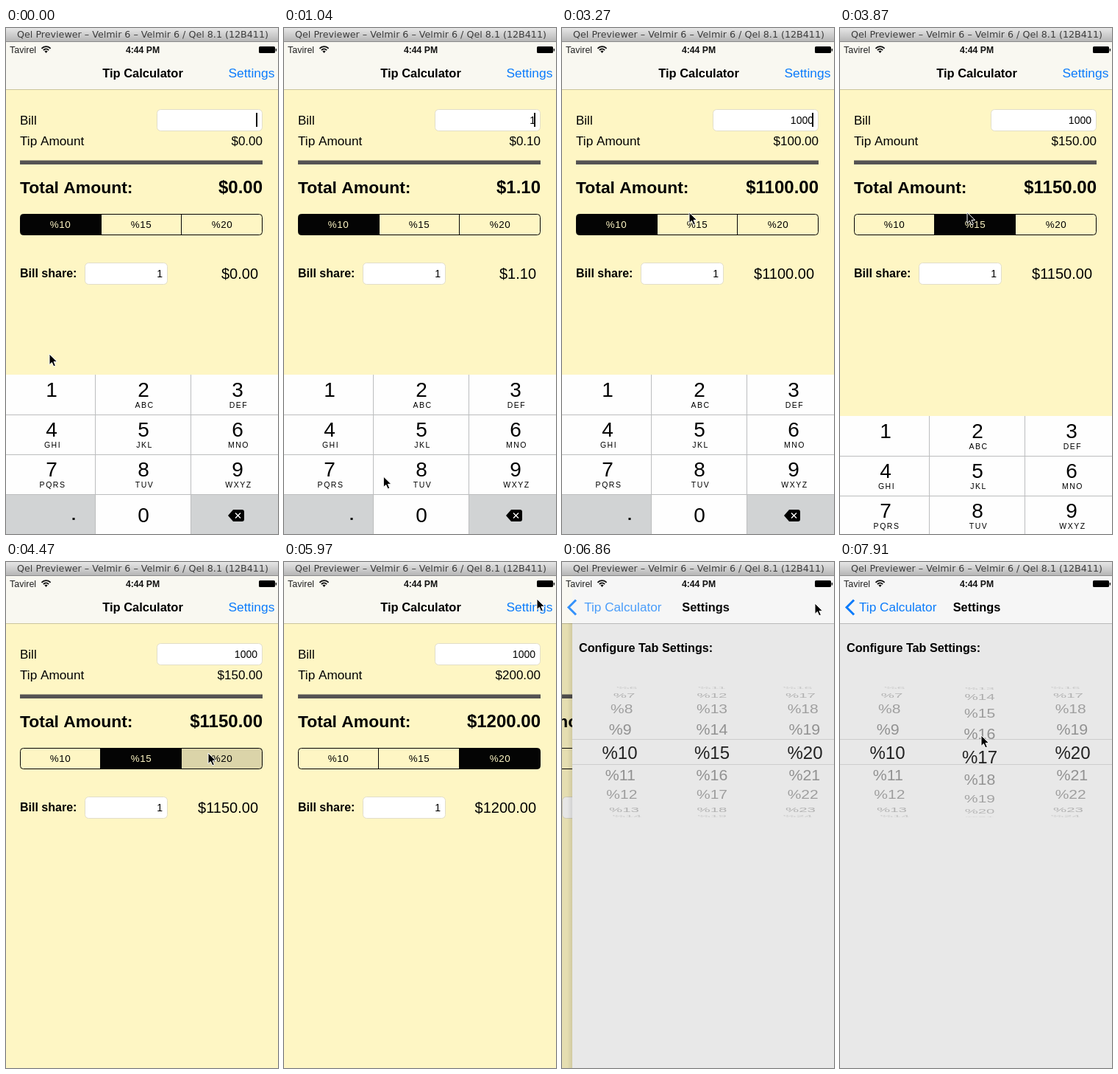
An HTML page with a canvas that plays this animation: 370 by 686 pixels, repeating every 8000 ms.

```html
<!DOCTYPE html>
<html lang="en">
<head>
<meta charset="utf-8">
<title>Tip Calculator</title>
<style>
html, body { margin: 0; height: 100%; overflow: hidden; }
canvas { display: block; width: 370px; height: 686px; }
</style>
</head>
<body>
<canvas id="stage"></canvas>
<script>
const W = 370, H = 686, LOOP = 8000, STEP = 149;
const SANS = '"Liberation Sans", Arial, sans-serif';
const YELLOW = '#fef6c4', BLUE = '#0a7bfb', BLACK = '#040404';
const canvas = document.getElementById('stage');
const c = canvas.getContext('2d');
const dpr = window.devicePixelRatio || 1;
canvas.width = W * dpr;
canvas.height = H * dpr;

// pointer path: step, x, y
const PATH = [[0, 59, 442], [1, 59, 442], [4, 62, 492], [5, 62, 492], [8, 172, 666],
  [12, 172, 666], [16, 172, 651], [18, 162, 580], [20, 160, 400], [22, 173, 250],
  [27, 173, 250], [30, 275, 259], [35, 275, 259], [40, 344, 50], [42, 344, 50],
  [44, 344, 56], [46, 344, 56], [49, 192, 290], [50, 192, 290], [53, 192, 235]];
const LETTERS = ['', 'ABC', 'DEF', 'GHI', 'JKL', 'MNO', 'PQRS', 'TUV', 'WXYZ'];
const KEY_X = [62, 187, 315], EDGES = [0, 122, 252, W];

const clamp = v => Math.max(0, Math.min(1, v));

function pointer(n) {
  const i = PATH.findIndex(k => k[0] >= n);
  if (i < 1) return PATH[i < 0 ? PATH.length - 1 : 0].slice(1);
  const [a, ax, ay] = PATH[i - 1], [b, bx, by] = PATH[i];
  const u = (n - a) / (b - a);
  return [ax + (bx - ax) * u, ay + (by - ay) * u];
}

function rect(x, y, w, h, fill) {
  c.fillStyle = fill;
  c.fillRect(x, y, w, h);
}

function text(s, x, y, size, { align = 'left', bold = false, color = '#000', font = SANS, gap = 0 } = {}) {
  c.font = `${bold ? 'bold ' : ''}${size}px ${font}`;
  c.letterSpacing = gap + 'px';
  c.textAlign = align;
  c.fillStyle = color;
  c.fillText(s, x, y);
}

function layer(draw, x = 0, y = 0, alpha = 1) {
  c.save();
  c.translate(x, y);
  c.globalAlpha *= alpha;
  draw();
  c.restore();
}

function shape(points, fill) {
  c.beginPath();
  points.forEach(([x, y]) => c.lineTo(x, y));
  c.closePath();
  c.fillStyle = fill;
  c.fill();
}

function field(x, y, w, h) {
  c.beginPath();
  c.roundRect(x + .5, y + .5, w - 1, h - 1, 5);
  c.fillStyle = '#fff';
  c.fill();
  c.strokeStyle = '#e2dec9';
  c.lineWidth = 1;
  c.stroke();
}

function segments(active, pressed) {
  layer(() => {
    c.beginPath();
    c.roundRect(19.5, 252.5, 329, 28, 4);
    c.save();
    c.clip();
    if (pressed >= 0) rect(19 + 110 * pressed, 252, 110, 29, '#dbd4a9');
    rect(19 + 110 * active - (active ? 1 : 0), 252, 111, 29, BLACK);
    rect(128, 252, 1, 29, BLACK);
    rect(238, 252, 1, 29, BLACK);
    c.restore();
    c.strokeStyle = BLACK;
    c.lineWidth = 1;
    c.stroke();
  });
  [10, 15, 20].forEach((v, i) => text('%' + v, 74 + 110 * i, 271, 13.4,
    { align: 'center', gap: .5, color: i === active ? YELLOW : '#000' }));
}

function calculator(n) {
  const bill = n < 4 ? 0 : n < 8 ? 1 : n < 11 ? 10 : n < 15 ? 100 : 1000;
  const active = n < 26 ? 0 : n < 31 ? 1 : 2;
  const pressed = n === 25 ? 1 : n === 30 ? 2 : -1;
  const tip = bill * [.1, .15, .2][active];
  const money = v => '$' + v.toFixed(2);
  const right = { align: 'right' };

  rect(0, 83, W, H - 83, YELLOW);
  text('Bill', 19, 131, 17);
  field(205, 110, 144, 30);
  if (bill) text(bill, 342, 130, 14, right);
  if (n < 26 && !(n >= 18 && n <= 20)) rect(340, 115, 2, 19, '#000');
  text('Tip Amount', 19, 159, 17.2);
  text(money(tip), 349, 159, 17, right);
  rect(19, 179.5, 330, 5.5, '#555353');
  text('Total Amount:', 19, 224, 22.9, { bold: true });
  text(money(bill + tip), 349, 224, 24, { align: 'right', bold: true });
  segments(active, pressed);
  text('Bill share:', 19, 338, 16, { bold: true });
  field(107, 318, 113, 30);
  text('1', 213, 338, 14, right);
  text(money(bill + tip), 343, 340, 20, right);
}

function keypad(n) {
  const down = n === 4 ? 0 : n === 8 || n === 11 || n === 15 ? 10 : -1;
  rect(0, 470, W, 216, '#fefefe');
  for (let i = 0; i < 12; i++) {
    const col = i % 3, y = 470 + 54 * Math.floor(i / 3);
    const x = EDGES[col], w = EDGES[col + 1] - x;
    if (i === 9 || i === 11 || i === down) rect(x, y, w, 54, '#d1d3d4');
    if (i < 9 || i === 10)
      text(i === 10 ? 0 : i + 1, KEY_X[col], y + (i === 10 ? 38 : 30), 28, { align: 'center' });
    if (i < 9)
      text(LETTERS[i], KEY_X[col] + 1.5, y + 45, 10.5, { align: 'center', gap: 1.5 });
  }
  for (const y of [524, 578, 632]) rect(0, y, W, 1, '#bcbdbe');
  for (const x of [121, 251]) rect(x, 470, 1, 216, '#bcbdbe');
  rect(90.5, 664, 3, 3, '#000');
  c.beginPath();
  c.moveTo(302, 661);
  c.lineTo(309, 653);
  c.arcTo(324, 653, 324, 661, 3);
  c.arcTo(324, 669, 309, 669, 3);
  c.lineTo(309, 669);
  c.fillStyle = '#000';
  c.fill();
  c.strokeStyle = '#fff';
  c.lineWidth = 1.4;
  c.beginPath();
  c.moveTo(312, 657.5); c.lineTo(319, 664.5);
  c.moveTo(319, 657.5); c.lineTo(312, 664.5);
  c.stroke();
}

function wheel(x, value) {
  const rows = draw => {
    for (let v = Math.ceil(value - 4.3); v <= value + 4.3; v++) draw('%' + v, (v - value) * .36);
  };
  layer(() => {
    c.beginPath();
    c.rect(0, 169, W, 71);
    c.rect(0, 275, W, 71);
    c.clip();
    rows((s, a) => {
      const cos = Math.cos(a), k = 1 - .09 * (1 - cos);
      layer(() => {
        c.scale(k, cos * k);
        text(s, 0, 7.4, 21.5, { align: 'center', color: `rgba(0,0,0,${.1 + .29 * cos})` });
      }, 190 + (x - 190) * k, 258 + 88 * Math.sin(a));
    });
  });
  layer(() => {
    c.beginPath();
    c.rect(0, 241, W, 33);
    c.clip();
    rows((s, a) => text(s, x, 266.5 + 96 * Math.sin(a), 24, { align: 'center', color: '#222' }));
  });
}

function settings() {
  rect(0, 19, W, H - 19, '#e8e8e8');
  text('Configure Tab Settings:', 9, 122, 16.2, { bold: true });
}

function pickers(n) {
  rect(0, 240, W, 1, '#cdcdcd');
  rect(0, 274, W, 1, '#cdcdcd');
  wheel(64.5, 10);
  wheel(190, 15 + 1.8 * clamp((n - 50) / 3));
  wheel(316.5, 20);
}

function navBar(n, p) {
  rect(0, 19, W, 64, 'rgba(249,249,249,.86)');
  rect(0, 83, W, 1, 'rgba(0,0,0,.2)');
  const fade = (1 - p) ** 2;
  const mid = { align: 'center', bold: true };
  layer(() => text('Tip Calculator', 186 - 97 * p, 67, 16.5, mid), 0, 0, fade);
  layer(() => text('Settings', 302.5, 67, 17.4, { color: BLUE }), 0, 0, n === 42 ? .3 : fade);
  if (!p) return;
  layer(() => text('Settings', 186 + 248 * (1 - p), 67, 16.4, mid), 0, 0, p);
  layer(() => {
    c.beginPath();
    c.moveTo(19, 51.5); c.lineTo(9, 61.5); c.lineTo(19, 71.5);
    c.strokeStyle = BLUE;
    c.lineWidth = 3;
    c.stroke();
  }, 0, 0, p ** 5);
  layer(() => text('Tip Calculator', 26 + 107 * (1 - p), 67, 17.2, { color: BLUE }), 0, 0, p ** 8);
}

function statusBar() {
  text('Tavirel', 5, 34, 12.5, { color: '#222' });
  text('4:44 PM', 186, 34, 12.2, { align: 'center', bold: true, color: '#111' });
  c.strokeStyle = '#111';
  c.lineWidth = 1.8;
  for (const r of [5, 8.3]) {
    c.beginPath();
    c.arc(54.5, 33.5, r, -Math.PI * .76, -Math.PI * .24);
    c.stroke();
  }
  shape([[54.5, 34], [52.3, 31.4], [54.5, 30.5], [56.7, 31.4]], '#111');
  c.beginPath();
  c.roundRect(344, 25, 22, 9, 1.5);
  c.fillStyle = '#000';
  c.fill();
  rect(366.7, 28, 1.3, 3.5, '#000');
}

function windowBar() {
  const g = c.createLinearGradient(0, 0, 0, 19);
  g.addColorStop(0, '#e6e6e6');
  g.addColorStop(1, '#b4b4b4');
  rect(0, 0, W, 19, g);
  rect(0, 18, W, 1, '#8a8a8a');
  text('Qel Previewer – Velmir 6 – Velmir 6 / Qel 8.1 (12B411)', 186, 13, 12.7,
    { align: 'center', color: '#3c3c3c', font: '"DejaVu Sans", sans-serif' });
}

function arrow() {
  shape([[0, 0], [0, 14.5], [3.4, 11.4], [5.8, 16.8], [8.4, 15.7], [6, 10.4], [10.6, 10.4]], '#000');
  c.strokeStyle = '#fff';
  c.lineWidth = 1;
  c.lineJoin = 'round';
  c.stroke();
}

function draw(t) {
  const n = Math.floor((t + 10) / STEP);
  // critically damped push of the settings page
  const x = 1.58 * Math.max(0, n - 42.8);
  const p = n > 48 ? 1 : 1 - (1 + x) * Math.exp(-x);
  c.setTransform(dpr, 0, 0, dpr, 0, 0);
  rect(0, 0, W, H, YELLOW);
  if (p < 1) {
    layer(() => calculator(n), Math.round(-111 * p));
    const drop = clamp((n - 25) / 3);
    if (drop < 1) layer(() => keypad(n), 0, 216 * drop * drop * (3 - 2 * drop));
  }
  if (p > 0) {
    const left = Math.round(W * (1 - p));
    rect(0, 83, left, H, `rgba(0,0,0,${.1 * p})`);
    const g = c.createLinearGradient(left - 7, 0, left, 0);
    g.addColorStop(0, 'rgba(0,0,0,0)');
    g.addColorStop(1, 'rgba(0,0,0,.09)');
    rect(left - 7, 83, 7, H, g);
    layer(() => { settings(); pickers(n); }, left);
  }
  navBar(n, p);
  statusBar();
  windowBar();
  layer(arrow, ...pointer(n));
}

function tick() {
  draw(performance.now() % LOOP);
  requestAnimationFrame(tick);
}
tick();
</script>
</body>
</html>
```
